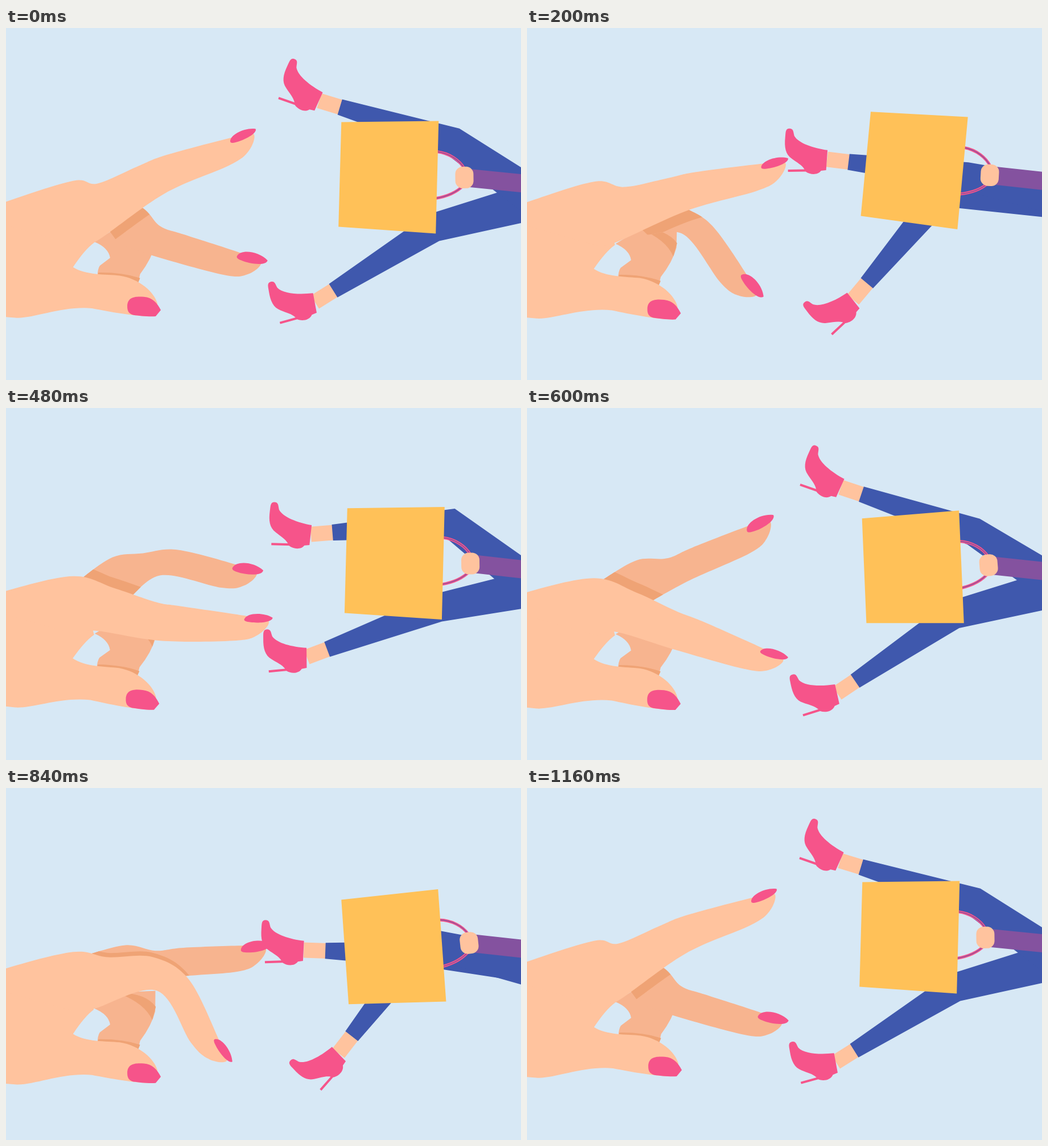
These frames come from a looping animation (905 px wide and 619 px high, 1.2 s). An HTML page with a canvas:

```html
<!DOCTYPE html>
<html lang="en">
<head>
<meta charset="utf-8">
<title>Finger walk</title>
<style>
html, body { margin: 0; width: 100%; height: 100%; overflow: hidden; background: #d7e8f5; }
canvas { display: block; }
</style>
</head>
<body>
<canvas id="stage" width="905" height="619"></canvas>
<script>
const ctx = document.getElementById('stage').getContext('2d');
const SKY = '#d7e8f5', SKIN = '#ffc39e', SHADE = '#f7b48f', SHADOW = '#efa375',
      PINK = '#f6548a', BLUE = '#3f58ad', SLEEVE = '#84529f', YELLOW = '#ffc158';
const CYCLE = 29, STEP = 40, LOOP = 1200, RAD = Math.PI / 180;

const shoe = new Path2D('M1-16C-24-20-50-29-57-42C-59-50-58-55-66-55C-73-55-72-46-73-40C-75-22-73-10-62-2C-53 5-45 9-40 17L-69 17L-69 21L-38 21C-30 27-17 28-11 20L-2 19Z');
const nail = new Path2D('M-27 3C-23-11 9-14 27-2C27 8 0 12-18 9C-25 8-28 6-27 3Z');
const curled = new Path2D('M155 374Q180 384 183 402L165 416Q161 422 161 436L231 452L236 430Q256 403 262 378L262 342L200 345Z');
const curledShadow = new Path2D('M200 346Q245 346 263 370L257 393Q243 364 200 348Z');
const thumbShadow = new Path2D('M161 434L163 428Q205 427 236 437L232 447L200 438Z');
const palm = new Path2D('M-9 340L140 330L154 376Q138 388 118 419C140 433 175 431 200 433C235 438 262 462 267 482L262 504C230 505 185 497 152 491C100 487 50 510 20 509L-9 507Z');
const thumbNail = new Path2D('M214 487C214 470 228 469 243 470C258 471 266 480 273 493L264 504C250 505 235 503 225 502C216 500 214 494 214 487Z');
const bag = new Path2D('M-215-100L-44-100L-51.5 98L-222.3 84Z');
const handle = new Path2D('M-48-46C-25-43-8-30 0-16M-51 36C-25 32-10 22-2 14');

// Sum of harmonics of the walk cycle: mean, then cosine and sine of each
function wave(p, mean, ...amps) {
  return amps.reduce((sum, amp, i) => {
    const angle = 2 * Math.PI * p / CYCLE * (1 + (i >> 1));
    return sum + amp * (i % 2 ? Math.sin(angle) : Math.cos(angle));
  }, mean);
}

// Point at a distance along a bone and a height above it
function along([x, y], degrees, far, up = 0) {
  const c = Math.cos(degrees * RAD), s = Math.sin(degrees * RAD);
  return [x + c * far + s * up, y + s * far - c * up];
}

function fill(path, color) {
  ctx.fillStyle = color;
  ctx.fill(path);
}

function polygon(points) {
  const path = new Path2D();
  points.forEach(p => path.lineTo(...p));
  path.closePath();
  return path;
}

function smooth(pts) {
  const path = new Path2D();
  path.moveTo(...pts[0]);
  for (let i = 0; i < pts.length - 1; i++) {
    const b = pts[i], c = pts[i + 1], a = pts[i - 1] || b, d = pts[i + 2] || c;
    path.bezierCurveTo(b[0] + (c[0] - a[0]) / 6, b[1] + (c[1] - a[1]) / 6,
      c[0] - (d[0] - b[0]) / 6, c[1] - (d[1] - b[1]) / 6, ...c);
  }
  path.closePath();
  return path;
}

function placed([x, y], degrees, draw) {
  ctx.save();
  ctx.translate(x, y);
  ctx.rotate(degrees * RAD);
  draw();
  ctx.restore();
}

function drawLeg(p, hipY) {
  const thigh = wave(p, 10.3, 24.4, -7.3, -.4, -3.3, .5);
  const shin = wave(p, -16.6, 21.7, 23.7, 9, .2, 2.8, -1.8);
  const foot = wave(p, -11.5, 13.5, 20.7, 13.4, -3.6, 3.8, -2.8);
  const hip = [wave(p, 932, 4, 18.6), hipY];
  const knee = along(hip, thigh, -183);
  const hem = along(knee, shin, -208);
  const ankle = along(hem, shin, -38);
  const bend = (shin + thigh) / 2, wide = 25 / Math.cos((thigh - shin) / 2 * RAD);

  ctx.strokeStyle = SKIN;
  ctx.lineWidth = 27;
  ctx.beginPath();
  ctx.moveTo(...knee);
  ctx.lineTo(...ankle);
  ctx.stroke();
  fill(polygon([
    along(hem, shin, 0, 14), along(knee, bend, 0, wide), along(hip, thigh, 60, 36),
    along(hip, thigh, 60, -36), along(knee, bend, 0, -wide), along(hem, shin, 0, -14)
  ]), BLUE);
  placed(ankle, foot, () => fill(shoe, PINK));
}

function drawBag(x, y, tilt) {
  fill(polygon([[x, y - 16], [905, y - 6], [905, y + 26], [x, y + 16]]), SLEEVE);
  placed([x, y], tilt, () => {
    ctx.strokeStyle = PINK;
    ctx.lineWidth = 5;
    ctx.stroke(handle);
    ctx.strokeStyle = SLEEVE;
    ctx.lineWidth = 1.5;
    ctx.stroke(handle);
    fill(bag, YELLOW);
    ctx.fillStyle = SKIN;
    ctx.beginPath();
    ctx.roundRect(-16, -19, 32, 38, 13);
    ctx.fill();
  });
}

// Two bones: root to joint, joint to tip
function finger(p, root, bone, length, half) {
  const lift = wave(p, -5.8, -24, 1, 3, 3.3, 0, 1);
  const curl = wave(p, 11.4, -15.3, -31.4, -15.3, -1.9, -2.5, -1);
  const joint = along(root, lift, bone);
  const tip = (far, up) => along(joint, curl, far * length, up);
  return {
    lift, curl, nailAt: tip(168, 13),
    outline: [
      along(joint, lift, -20, half), tip(30, half - 2), tip(148, 16), tip(186, 8),
      tip(167, -17), tip(125, -28), along(joint, (lift + curl) / 2, 0, -half)
    ]
  };
}

function drawNail({ nailAt, curl }, sx, sy) {
  placed(nailAt, curl, () => {
    ctx.scale(sx, sy);
    fill(nail, PINK);
  });
}

function drawHand(p) {
  const drop = wave(p, 9.1, -9.25, -2.6, .6, -1);
  const tilt = wave(p, 1.2, -.64, .77);
  const root = [140, 325 + drop];
  const inPalm = draw => placed([0, 400 + drop], tilt, () => {
    ctx.translate(0, -400);
    draw();
  });

  const near = finger(p, root, 140, 1, 32);
  const nearPath = smooth([
    [-60, 330 + drop], [0, 305 + drop], [118, 268 + 1.65 * drop], along(root, near.lift, 42, 37),
    ...near.outline, [158, 375 + drop], [125, 382 + drop]
  ]);
  const far = finger(p + CYCLE / 2, root, 150, .92, 26);
  const farPath = smooth([
    [130, 285 + drop], along(root, far.lift, 80, 46), ...far.outline, along(root, far.lift, 75, -30)
  ]);

  inPalm(() => {
    fill(curled, SHADE);
    fill(curledShadow, SHADOW);
  });
  fill(farPath, SHADE);
  ctx.save();
  ctx.clip(farPath);
  ctx.translate(0, Math.max(-18, Math.min(20, far.lift - near.lift)));
  fill(nearPath, SHADOW);
  ctx.restore();
  drawNail(far, 1, 1);

  inPalm(() => {
    fill(thumbShadow, SHADOW);
    fill(palm, SKIN);
    fill(thumbNail, PINK);
  });
  fill(nearPath, SKIN);
  drawNail(near, .92, .8);
}

function render(now) {
  const p = Math.floor(now % LOOP / STEP) % CYCLE;
  const x = wave(p, 812.4, -3.1, 2, -3.8, -2);
  const y = wave(p, 268.3, -6.7, -4.9, 1.3, -1.5);
  ctx.fillStyle = SKY;
  ctx.fillRect(0, 0, 905, 619);
  drawLeg(p + CYCLE / 2, y + 41);
  drawLeg(p, y + 41);
  drawBag(x, y, wave(p, -1.8, 1.7, 4.7, -.6, -.4));
  drawHand(p);
}

const start = performance.now();
function tick() {
  render(performance.now() - start);
  requestAnimationFrame(tick);
}
tick();
</script>
</body>
</html>
```
